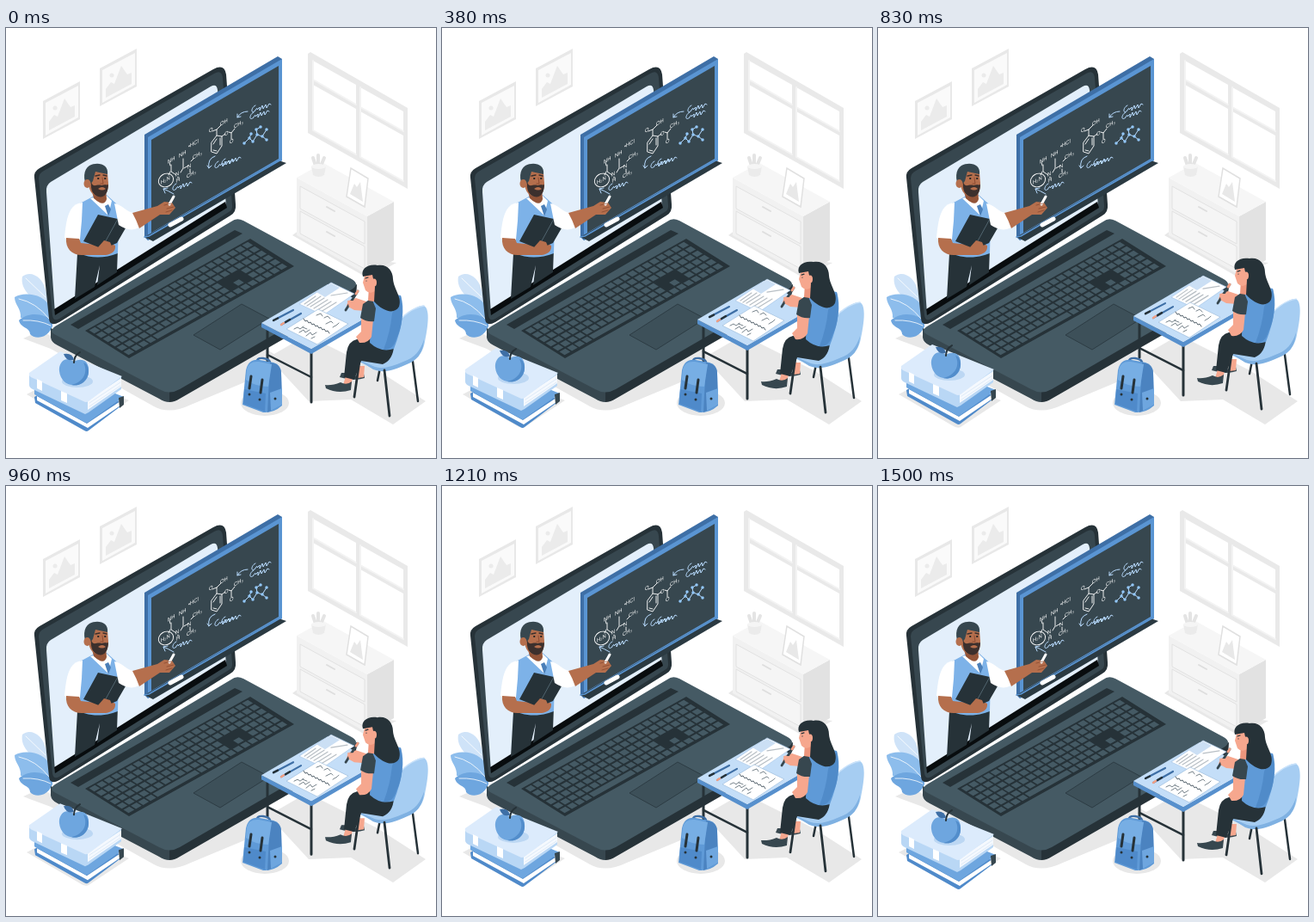
Animation, 500 px wide and 500 px high, one loop 1540 ms. Source, as an HTML page:

```html
<!DOCTYPE html>
<html lang="en">
<meta charset="utf-8">
<title>Online lesson</title>
<style>
  html, body { margin: 0; height: 100%; overflow: hidden; background: #fff }
  svg { display: block; width: 100%; height: 100% }
  text { font: 6.5px "Liberation Sans", Arial, sans-serif; fill: #fff }
  .line { fill: none; stroke-linecap: round; stroke-linejoin: round }
</style>
<svg viewBox="0 0 500 500">
  <!-- wall -->
  <g id="picture">
    <path d="M43 85 86 62V106L43 129Z" fill="#e8e8e8"/>
    <path d="M46 87 84 67V104L46 125Z" fill="#fafafa"/>
    <path d="M50 119V109L56 101 60 103 68 82 75 92 80 90V103Z" fill="#ebebeb"/>
    <circle cx="57" cy="93" r="2.5" fill="#ebebeb"/>
  </g>
  <use href="#picture" x="66" y="-38"/>
  <path d="M351 30 354 28 467 93V187L351 122Z" fill="#e9e9e9"/>
  <path d="M357 38 407 66V89L357 60ZM412 69 462 97V120L412 92ZM357 66 407 94V147L357 119ZM412 97 462 125V178L412 150Z" fill="#fff"/>
  <path d="M357 38V119L407 147M412 69V150L462 178M357 60 407 89M412 92 462 120" class="line" stroke="#f3f3f3" stroke-width="2"/>

  <!-- floor shadows -->
  <g fill="#e8e8e8">
    <path d="M20 361 40 352 190 425 300 372 330 390 215 438Q190 450 172 440L52 373Z"/>
    <path d="M305 383 350 357 432 398 488 434 450 461 401 432 352 434Z"/>
    <ellipse cx="301" cy="436" rx="28" ry="15"/>
    <path d="M24 426 66 404 143 433 96 464Q92 466 86 462Z"/>
    <path d="M333 241 345 232 430 270 454 273 421 291Z"/>
  </g>

  <!-- cabinet -->
  <path d="M338 174 420 219V287L338 241Z" fill="#f1f1f1"/>
  <path d="M420 219 451 202V270L420 287Z" fill="#e2e2e2"/>
  <path d="M338 174 369 157 451 202 420 219Z" fill="#f6f6f6"/>
  <g fill="#f5f5f5" stroke="#e2e2e2">
    <path id="drawer" d="M342 184 417 225V251L342 210Z"/>
    <use href="#drawer" y="29"/>
  </g>
  <path d="M373 208 382 213M373 237 382 242" class="line" stroke="#dedede" stroke-width="2"/>
  <path d="M396 196 401 163 421 175 417 208Z" fill="#fff" stroke="#e0e0e0" stroke-width="1.5"/>
  <path d="M400 193 405 181 408 185 412 179 415 202Z" fill="#e8e8e8"/>
  <path d="M363 163V148M361 163 357 151M365 163 370 151" class="line" stroke="#e4e4e4" stroke-width="4"/>
  <path d="M355 161H372L370 171Q363 175 357 171Z" fill="#ebebeb"/>
  <ellipse cx="363.500" cy="161" rx="8.500" ry="3" fill="#f5f5f5"/>

  <!-- plant -->
  <path d="M52 322C30 319 16 303 19 289 29 281 43 290 46 305Z" fill="#cfe3f8"/>
  <path d="M54 341C35 351 24 336 17 337 18 326 10 322 10 313 20 306 46 309 51 325Z" fill="#8dbdec"/>
  <path d="M54 347C48 362 33 362 28 356 28 348 17 349 15 340 26 329 46 332 54 341Z" fill="#6ea6df"/>
  <path d="M23 291 46 313M15 315Q35 319 50 338M20 340Q38 339 52 346" class="line" stroke="#fff" stroke-width=".8"/>

  <!-- laptop -->
  <path d="M52 349V360Q53 366 60 369L178 431Q184 435 190 435V410Z" fill="#37474f"/>
  <path d="M190 435Q196 435 202 431L402 316Q408 312 408 298L190 405Z" fill="#263238"/>
  <path d="M57 347 262 225Q268 220 276 224L402 292Q412 298 402 304L202 420Q190 427 178 420L56 356Q50 352 57 347Z" fill="#455a64"/>
  <path d="M75 345 266 235 275 239 84 350Z" fill="#263238"/>
  <path d="M218 357 274 321 306 338 249 374Z" fill="#3d5059" stroke="#2d3c44"/>
  <g transform="matrix(192 -107 51 32 92 352)">
    <rect width="1" height="1" fill="#263238"/>
    <g id="keys" fill="#455a64"/>
  </g>
  <path d="M33 174Q32 167 39 163L241 48Q254 41 256 54L267 205Q268 214 261 218L62 342Q51 348 50 338Z" fill="#263238"/>
  <path d="M38 175Q38 169 44 166L242 53Q251 48 252 58L263 206Q264 211 259 214L62 338Q55 342 54 334Z" fill="#37474f"/>
  <path d="M47 191Q46 183 52 179L238 68Q245 64 246 72L256 208 57 332Z" fill="#e3effb"/>
  <path d="M56 327 255 202 257 209 57 334Z" fill="#080c0e"/>

  <!-- teacher -->
  <path d="M83 262 130 257 129 284 106 299 109 276 103 301 80 315Z" fill="#263238"/>
  <path d="M86 204 101 196 117 194 128 204 131 221 130 262Q106 271 85 262Z" fill="#7db2e8"/>
  <path d="M98 198 116 194 123 201 119 218Z" fill="#fff"/>
  <path d="M115 207 119 205 122 211 119 219Z" fill="#4b7fb8"/>
  <path d="M99 186 116 187 117 199Q114 209 102 198Z" fill="#925438"/>
  <path d="M89 203C73 204 70 222 68 244Q75 250 86 246L88 224Z" fill="#fff"/>
  <path d="M70 244C69 256 76 264 88 264L116 264Q128 262 127 253L117 248 105 252 87 250 85 245Z" fill="#b56f4d"/>
  <path d="M107 217 130 222 147 219 129 250 113 257 90 248Z" fill="#263238"/>
  <path d="M130 222 113 253" class="line" stroke="#51656f"/>
  <path d="M107 255 114 247 121 249 124 256 116 264Z" fill="#b56f4d"/>
  <path d="M97 169Q106 163 118 168L119 181Q119 195 109 196 97 195 96 181Z" fill="#b56f4d"/>
  <path d="M95 185C89 177 90 164 97 160 106 155 120 158 118 170L104 167 101 178Z" fill="#37474f"/>
  <path d="M99 179C102 187 105 181 111 183 116 181 119 184 119 181 119 194 113 198 107 196 101 194 98 188 99 179Z" fill="#3c302d"/>
  <path d="M107 187Q112 183 116 187 112 190 107 187Z" fill="#b56f4d"/>
  <ellipse cx="94.500" cy="181" rx="4" ry="5" fill="#b56f4d"/>
  <path d="M104 172 109 171M113 171 117 172" class="line" stroke="#3c302d" stroke-width="1.300"/>
  <path d="M107 175H107.500M115 175H115.500" class="line" stroke="#222" stroke-width="1.800"/>
  <path d="M112 174 113 181 110 181" class="line" stroke="#85452d" stroke-width=".8"/>

  <!-- chalkboard -->
  <path d="M161 124 316 33 321 36V154L165 247 161 243Z" fill="#3e6fa6"/>
  <path d="M165 127 321 36V154L165 247Z" fill="#5a95d3"/>
  <path d="M169 130 317 44V152L169 238Z" fill="#37474f"/>
  <path d="M161 243 317 154 326 157 171 248Z" fill="#2b3a42"/>
  <path d="M161 243 166 242 320 153" class="line" stroke="#5a95d3" stroke-width="1.500"/>
  <path d="M191 229 204 222" class="line" stroke="#fff" stroke-width="5"/>
  <g class="line" stroke="#fff" stroke-width=".9">
    <ellipse cx="186" cy="177" rx="9" ry="7.500" transform="rotate(-30 186 177)"/>
    <path d="M192 159V167L198 171M191 167 189 171M203 168 206 163V152M207 163 212 160M215 155 218 152M214 164V168M200 173V175M190 156 191 160"/>
    <path d="M239 133 245 125 251 126 251 137 245 146 239 144ZM241 135 245 129M249 128V136M245 143 241 142M245 125V118L240 120M245 118 250 113M251 126 255 123M259 121 262 122 266 117M262 122 262 129"/>
  </g>
  <g id="labels"></g>
  <g class="line" stroke="#b9dcff" stroke-width="1">
    <path d="M195 193Q188 189 183 187L185 192M183 187 188 186"/>
    <path id="scrawl" d="M198 181C193 183 192 192 198 187 198 185 201 183 200 186L203 183 203 187 206 181 207 185 210 180 211 184 214 179 216 180"/>
    <use href="#scrawl" x="92" y="-91"/><use href="#scrawl" x="90" y="-83"/>
    <use href="#scrawl" x="49" y="-26"/><use href="#scrawl" x="57" y="-29"/>
    <path d="M281 97Q273 97 269 104L269 100M269 104 273 103M243 149Q234 152 236 163L234 160M236 163 239 160"/>
    <path d="M277 134 283 128 287 132 292 124 298 126 303 130M283 128 285 123M292 124 291 118 296 115M298 126 303 118"/>
  </g>
  <path d="M277 134h0M283 128h0M287 132h0M292 124h0M298 126h0M303 130h0M285 123h0M291 118h0M296 115h0M303 118h0" class="line" stroke="#92c7fa" stroke-width="3.500"/>

  <path d="M126 204C136 206 141 215 149 215L155 232Q144 238 131 229Z" fill="#fff"/>
  <path d="M147 215 176 207 184 202 193 203 197 209 190 217 179 217 155 233Q152 224 147 215Z" fill="#b56f4d"/>
  <path d="M190 205 195 196" class="line" stroke="#fff" stroke-width="3"/>
  <path d="M184 206 192 204M187 210 195 208M186 214 193 212" class="line" stroke="#85452d" stroke-width=".7"/>

  <!-- books, floating -->
  <g class="float">
    <path d="M33 429 70 407 137 437 96 468Q94 470 91 468L34 436Z" fill="#4f8aca"/>
    <path d="M36 428 94 460 133 434V439L95 465 36 433Z" fill="#fff"/>
    <path d="M33 421 70 402 137 429 96 458Q94 460 91 458L33 426Z" fill="#6ea6df"/>
    <path d="M131 430 137 428V438L132 442Z" fill="#37474f"/>
    <path d="M27 402V415Q27 418 31 420L92 449 96 447 134 420V406Z" fill="#b9d7f5"/>
    <path d="M95 433 134 407V417L95 444Z" fill="#f5f9fe"/>
    <path d="M97 436 133 412M97 440 133 416" class="line" stroke="#cfe0f2" stroke-width=".6"/>
    <path d="M27 401 63 376 135 405 96 434Q93 436 90 434L29 406Q26 404 27 401Z" fill="#dcebfc"/>
    <path d="M36 408 42 411V422L36 419ZM64 422 71 425V436L64 433Z" fill="#fff"/>
    <ellipse cx="83" cy="411" rx="18" ry="7" fill="#bcd7f3"/>
    <path d="M79 388C67 380 61 391 62 399 63 410 72 416 79 415 90 416 97 407 96 397 96 386 87 383 79 388Z" fill="#6ea6df"/>
    <path d="M90 389C96 400 90 412 76 415 89 418 97 407 96 397Q95 390 90 389Z" fill="#528dcb"/>
    <path d="M79 389Q79 381 86 377" class="line" stroke="#263238" stroke-width="2"/>
    <path d="M79 386Q70 388 67 379 77 377 79 386Z" fill="#3e6fa6"/>
  </g>

  <!-- desk, student and chair, floating -->
  <g class="float">
    <g class="line" stroke="#263238">
      <path d="M304 350V391M355 376V435" stroke-width="3"/>
      <path d="M304 380 355 406" stroke-width="2.500"/>
      <path d="M435 395 432 410M473 388 479 434" stroke-width="2.500"/>
    </g>
    <path d="M297 343 355 373 432 329V334L355 379 297 348Z" fill="#5790cd"/>
    <path d="M297 343 374 298 432 329 355 373Z" fill="#c4def8"/>
    <path d="M341 321 378 296 405 309 369 334Z" fill="#fff" stroke="#a9c8e8" stroke-width=".7"/>
    <path d="M361 307 378 297 388 302 371 313Z" fill="#cbdff4"/>
    <path d="M347 321 360 312M350 323 366 312M354 324 370 314M358 326 374 316M362 328 378 318M366 330 384 319M378 311 397 308" class="line" stroke="#b8bfc5" stroke-width="1.200"/>
    <path d="M326 350 363 327 398 344 362 368Z" fill="#fff" stroke="#9fbfdf" stroke-width=".7"/>
    <path d="M346 338l2 3 2-1 2 3 2-1 2 3 2-1 2 3 2-1 2 3 2-1 2 3 2-1 2 3 2-1 2 3" class="line" stroke="#52606a"/>
    <path d="M335 350l4-2 3 2 4-3M341 354l5-3 2 3 5-3M349 358l5-4 2 3 5-3M355 361l4-2M361 334l5-2 2 3M370 337l4-2 3 3M372 344l6-3 2 2M380 348l5-3 2-2M345 348l5 2" class="line" stroke="#77838b"/>
    <path d="M311 340 334 328M320 345 343 332" class="line" stroke="#3e6fa6" stroke-width="2.200"/>
    <path d="M311 340 316 337.500M325 342 330 339" class="line" stroke="#263238" stroke-width="2.400"/>
    <path d="M320 345 323 343" class="line" stroke="#f3a085" stroke-width="2.400"/>

    <!-- far arm and pen -->
    <path d="M417 329 405 328 396 323 398 317 407 314 419 318Z" fill="#f6a78e"/>
    <path d="M395 328 409 306" class="line" stroke="#37474f" stroke-width="2.800"/>
    <path d="M407 309 409 306" class="line" stroke="#f3a085" stroke-width="2.800"/>
    <path d="M397 317 405 317 409 322 399 325" fill="#f6a78e"/>
    <!-- chair -->
    <path d="M430 382 448 353C456 338 478 321 486 323 494 327 490 350 487 365 484 382 474 386 464 390 447 400 435 400 427 396L410 388Q405 383 411 376Z" fill="#a6cdf2"/>
    <path d="M408 385 429 394Q440 398 462 388C476 383 482 375 486 362 485 380 477 387 464 392 445 401 435 400 427 397Z" fill="#7fb1e2"/>
    <path d="M486 323Q467 326 451 348" class="line" stroke="#c9e2fa" stroke-width="1.500"/>
    <!-- legs -->
    <path d="M390 401 398 401 398 407 416 402 417 407Q406 411 388 406Z" fill="#37474f"/>
    <path d="M408 393H417L416 406 409 407Z" fill="#f6a78e"/>
    <path d="M395 405 403 407 401 416 392 415Z" fill="#f6a78e"/>
    <path d="M371 415Q379 416 389 412 396 416 402 411L401 421Q386 426 372 419Z" fill="#37474f"/>
    <path d="M451 370 424 361 408 362Q398 364 396 377L393 406 405 409 413 387 438 391Q450 386 451 370Z" fill="#263238"/>
    <path d="M411 387 405 429M440 398 446 451" class="line" stroke="#263238" stroke-width="2.800"/>
    <!-- torso -->
    <path d="M425 318Q443 307 459 311C464 327 461 347 451 373Q436 378 423 366Z" fill="#5f9ad7"/>
    <path d="M449 332Q447 353 439 374 450 375 454 361 464 342 459 311Z" fill="#508bc9"/>
    <path d="M413 335 427 339 425 359Q421 367 411 366L407 359 413 353Z" fill="#f6a78e"/>
    <path d="M415 321 425 314 430 326 428 341Q419 342 412 337Z" fill="#37474f"/>
    <!-- head -->
    <path d="M422 301 434 300V319L421 317Z" fill="#ed967d"/>
    <path d="M418 284 415 296 418 305Q424 311 431 304L433 286Z" fill="#f6a78e"/>
    <path d="M415 289C412 280 421 274 432 276 443 274 450 282 450 292 451 304 461 313 457 324 451 334 438 329 428 318L429 301 426 287Z" fill="#263238"/>
    <ellipse cx="428" cy="296" rx="3" ry="4.500" fill="#f6a78e"/>
    <path d="M418 291 421 290M419 294h0" class="line" stroke="#263238" stroke-width="1.200"/>
  </g>

  <!-- backpack -->
  <path d="M291 390Q291 383 299 384 308 385 307 391" class="line" stroke="#3e6fa6" stroke-width="2.500"/>
  <path d="M279 398Q282 384 295 386L311 389Q319 391 320 401L321 439Q311 448 299 447L275 438Z" fill="#5f9ad7"/>
  <path d="M307 389Q320 390 320 402L321 438 304 447Z" fill="#4b83c0"/>
  <path d="M280 397Q282 387 294 388L309 391 305 417Q290 417 279 409Z" fill="#77aee4"/>
  <path d="M277 420 302 425 301 446 276 437Z" fill="#4f8aca"/>
  <path d="M307 424 321 419V438L308 445Z" fill="#6ea6df"/>
  <path d="M285 405 283 419M298 409 296 424" class="line" stroke="#263238" stroke-width="3"/>
  <path d="M283 426h0M295 432h0M313 431h0" class="line" stroke="#263238" stroke-width="3"/>
</svg>
<script>
  const LOOP = 1540, RISE = 8;
  const byId = id => document.getElementById(id);

  function add(parent, tag, attributes, content = '') {
    const node = document.createElementNS('http://www.w3.org/2000/svg', tag);
    for (const name in attributes) node.setAttribute(name, attributes[name]);
    node.textContent = content;
    parent.append(node);
  }

  // Unit-square keyboard: letter block, arrow cluster and number pad.
  const columns = 22, rows = 6;
  for (let row = 0; row < rows; row++) {
    for (let column = 0; column < columns; column++) {
      const cluster = column > 14 && column < 18;
      if (cluster && (row === 3 || (row === 4 && column !== 16))) continue;
      const space = row === 5 && column === 4;
      if (row === 5 && column > 4 && column < 10) continue;
      add(byId('keys'), 'rect', {
        x: .015 + column * .97 / columns, y: .035 + row * .94 / rows,
        width: (space ? 6 : 1) * .97 / columns - .009, height: .94 / rows - .04
      });
    }
  }

  const labels = [
    [188, 158, 'NH'], [201, 151, 'NH'], [212, 140, '•HCl'], [180, 182, 'H₂N'],
    [197, 173, 'N'], [198, 180, 'H'], [211, 164, 'N'], [217, 153, 'CH₃'],
    [210, 175, 'CH₃'], [236, 122, 'O'], [249, 114, 'OH'], [254, 126, 'O'],
    [260, 135, 'O'], [265, 117, 'CH₃']
  ];
  for (const [x, y, label] of labels)
    add(byId('labels'), 'text', { transform: `matrix(.9 -.52 0 1 ${x} ${y})` }, label);

  const floating = document.querySelectorAll('.float');
  function draw(now) {
    const lift = RISE * (1 - Math.cos(2 * Math.PI * now / LOOP)) / 2;
    for (const group of floating) group.setAttribute('transform', `translate(0 ${-lift})`);
    requestAnimationFrame(() => draw(performance.now()));
  }
  draw(performance.now());
</script>
</html>
```
